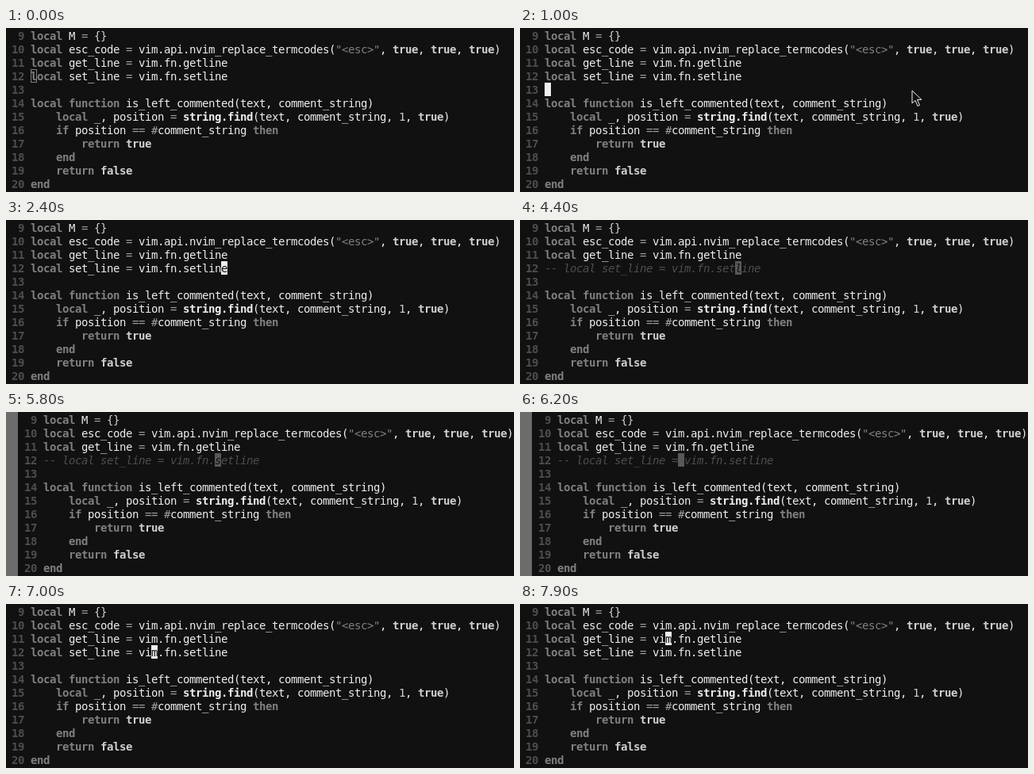
Animation of 640x207 px, one loop 8 s. Source, as an HTML page:

```html
<!DOCTYPE html>
<html lang="en">
<head>
<meta charset="utf-8">
<title>Commenting a line</title>
<style>
  html, body { margin: 0; width: 100%; height: 100%; overflow: hidden; background: #111; }
  #stage { position: relative; width: 640px; height: 207px; overflow: hidden; background: #111; }
  #code, #cursor {
    position: absolute; margin: 0; white-space: pre; color: #eee;
    font: 14px/19px "DejaVu Sans Mono", monospace;
    letter-spacing: calc(8px - 1ch); font-variant-ligatures: none;
  }
  #code { top: 1px; }
  #code div { height: 17px; }
  #sign { position: absolute; width: 15px; height: 207px; background: #6c6c6c; }
  #cursor { width: 8px; height: 17px; background: #eee; color: #111; }
  #cursor.hollow { box-sizing: border-box; background: none; border: 1px solid #808080; }
  #cursor.dim { background: #585858; font-style: italic; }
  #pointer { position: absolute; width: 14px; height: 22px; }
  .number { color: #4e4e4e; font-weight: bold; }
  .keyword { color: #808080; font-weight: bold; }
  .boolean { color: #d0d0d0; font-weight: bold; }
  .builtin { font-weight: bold; }
  .string { color: #808080; }
  .operator { color: #a0a0a0; }
  .light { color: #d0d0d0; }
  .comment { color: #4e4e4e; font-style: italic; }
</style>
</head>
<body>
<div id="stage">
  <div id="sign"></div>
  <div id="code"></div>
  <div id="cursor"></div>
  <svg id="pointer" viewBox="0 0 14 22">
    <path d="M1 1V17L5 13.5L8 20.5L10.5 19.5L7.5 12.5H13Z" fill="#111" stroke="#eee"/>
  </svg>
</div>
<script>
const LOOP = 8000, CELL = 8, ROW = 17, FIRST = 9, TARGET = 3;
const source = `local M = {}
local esc_code = vim.api.nvim_replace_termcodes("<esc>", true, true, true)
local get_line = vim.fn.getline
local set_line = vim.fn.setline

local function is_left_commented(text, comment_string)
    local _, position = string.find(text, comment_string, 1, true)
    if position == #comment_string then
        return true
    end
    return false
end`.split("\n");

const [sign, code, cursor, pointer] =
  ["sign", "code", "cursor", "pointer"].map(id => document.getElementById(id));

const syntax = new RegExp([
  "(?<comment>^--.*)",
  "(?<keyword>\\b(?:local|function|if|then|return|end)\\b)",
  "(?<boolean>\\b(?:true|false)\\b)",
  "(?<builtin>string\\.find)",
  '(?<string>"[^"]*")',
  "(?<light>[{}]+|\\b1\\b)",
  "(?<operator>[=#]+)"
].join("|"), "g");

const span = (kind, text) => `<span class="${kind}">${text.replace("<", "&lt;")}</span>`;

function highlight(line) {
  return line.replace(syntax, (text, ...rest) => {
    const groups = rest.at(-1);
    return span(Object.keys(groups).find(kind => groups[kind]), text);
  });
}

code.innerHTML = source.map((line, i) =>
  `<div>${span("number", String(FIRST + i).padStart(3))} <span>${highlight(line)}</span></div>`
).join("");
const targetText = code.children[TARGET].lastChild;
const plain = source[TARGET], commented = "-- " + plain;

function cursorCell(t) {
  if (t < 1000) return [TARGET, 0];
  if (t < 2400) return [TARGET + 1, 0];
  if (t < 5300) return [TARGET, 30];
  if (t < 5800) return [TARGET, 29];
  const steps = Math.min(5, Math.floor((t - 5800) / 100) + 1);
  return [t < 7900 ? TARGET : TARGET - 1, 29 - 2 * steps];
}

function drawPointer(t) {
  pointer.style.display = t >= 500 && t < 1100 ? "" : "none";
  const step = Math.min(2, Math.floor((t - 500) / 100));
  pointer.style.left = (t < 900 ? 609 - 85 * step : 493) + "px";
  pointer.style.top = 46 + 16 * step + "px";
}

let lastText = plain;
function draw(t) {
  const isComment = t >= 4400 && t < 7000;
  const hasSign = t >= 4600 && t < 7000;
  const text = isComment ? commented : plain;
  if (text !== lastText) targetText.innerHTML = highlight(lastText = text);

  const left = hasSign ? 15 : -1;
  sign.style.display = hasSign ? "" : "none";
  code.style.left = left + "px";

  const [row, col] = cursorCell(t);
  const hollow = t < 1000;
  cursor.className = hollow ? "hollow" : isComment ? "dim" : "";
  cursor.textContent = hollow ? "" : (row === TARGET ? text : source[row])[col] || "";
  cursor.style.left = left + (col + 4) * CELL + "px";
  cursor.style.top = 1 + row * ROW + "px";
  drawPointer(t);
}

const start = performance.now();
function tick() {
  draw((performance.now() - start) % LOOP);
  requestAnimationFrame(tick);
}
tick();
</script>
</body>
</html>
```
